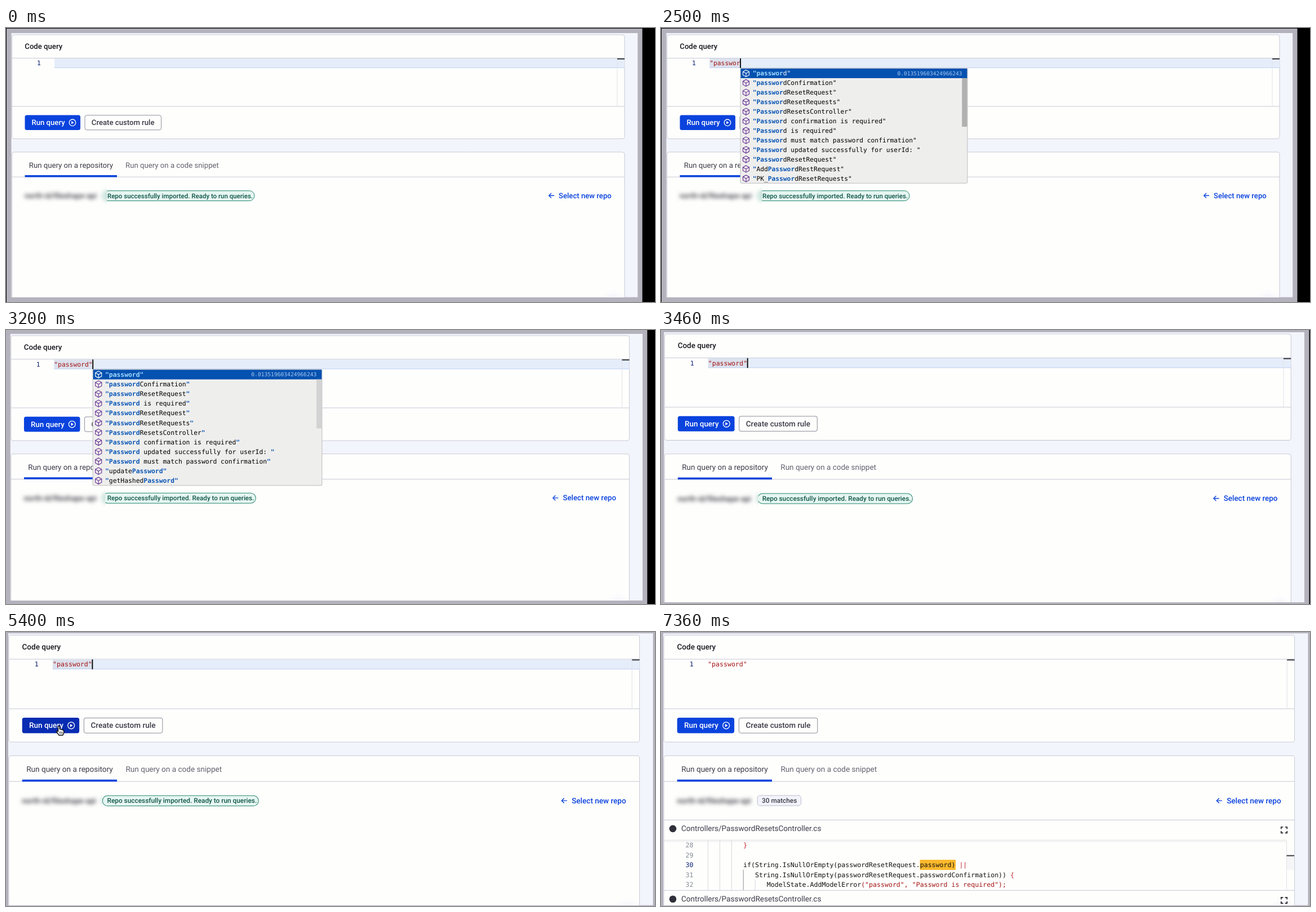
Recreate the animation shown at these times as an HTML page with a canvas. Size 1152 by 486 pixels, loop 8.53 s.

```html
<!DOCTYPE html>
<html lang="en">
<head>
<meta charset="utf-8">
<title>Code query</title>
<style>
html, body { margin: 0; width: 100%; height: 100%; overflow: hidden; background: #000; }
canvas { display: block; }
</style>
</head>
<body>
<canvas id="stage" width="1152" height="486"></canvas>
<script>
const ctx = document.getElementById('stage').getContext('2d');
ctx.textRendering = 'geometricPrecision';

const LOOP = 8530;
const BLUE = '#0a43dd', LINE = '#c9cad5', INK = '#3b3b48', PAPER = '#fefefd', RED = '#a31515';
const SANS = 'Roboto, sans-serif', MONO = '"DejaVu Sans Mono", monospace';
const QUERY = '"password"';
const KEYS = [800, 1460, 1600, 1760, 2000, 2130, 2330, 2500, 2630, 3060];
const POPUP = [1530, 3240], ZOOM = [2780, 3830], CLICK = 5500, CLEAR = 5660;
const TEXT_X = 86.3, CHAR = 6.77, CODE_CHAR = 6.97;

const TYPING_LIST = ['password', 'passwordConfirmation', 'passwordResetRequest', 'PasswordResetRequests',
  'PasswordResetsController', 'Password confirmation is required', 'Password is required',
  'Password must match password confirmation', 'Password updated successfully for userId: ',
  'PasswordResetRequest', 'AddPasswordRestRequest', 'PK_PasswordResetRequests'];
const CLOSED_LIST = ['password', 'passwordConfirmation', 'passwordResetRequest', 'Password is required',
  'PasswordResetRequest', 'PasswordResetRequests', 'PasswordResetsController',
  'Password confirmation is required', 'Password updated successfully for userId: ',
  'Password must match password confirmation', 'updatePassword', 'getHashedPassword'];

const clamp = v => Math.max(0, Math.min(1, v));
const progress = (t, [a, b]) => clamp((t - a) / (b - a));
const smoother = u => u * u * u * (u * (6 * u - 15) + 10);

function rect(x, y, w, h, fill) {
  ctx.fillStyle = fill;
  ctx.fillRect(x, y, w, h);
}

function box(x, y, w, h, r, fill, stroke, width = 1) {
  ctx.beginPath();
  ctx.roundRect(x, y, w, h, r);
  ctx.fillStyle = fill;
  ctx.fill();
  if (stroke) paint(stroke, width);
}

function paint(color, width) {
  ctx.strokeStyle = color;
  ctx.lineWidth = width;
  ctx.stroke();
}

function poly(points, color, width, close) {
  ctx.beginPath();
  points.forEach(([x, y]) => ctx.lineTo(x, y));
  if (close) ctx.closePath();
  paint(color, width);
}

function circle(x, y, r) {
  ctx.beginPath();
  ctx.arc(x, y, r, 0, 7);
}

function clip(x, y, w, h) {
  ctx.beginPath();
  ctx.rect(x, y, w, h);
  ctx.clip();
}

function text(s, x, y, color, size = 13.15, weight = 500, family = SANS, align = 'left') {
  ctx.font = `${weight} ${size}px ${family}`;
  ctx.fillStyle = color;
  ctx.textAlign = align;
  ctx.fillText(s, x, y);
}

const mono = (s, x, y, color, weight = 400, size = 11.25, align) =>
  text(s, x, y, color, size, weight, MONO, align);

function badge() {
  box(172, 288.7, 269, 17.8, 9, '#e6f6f1', '#25866f');
  text('Repo successfully imported. Ready to run queries.', 180, 301.5, '#0f5548', 11.5);
}

// The repository name and whatever lies left of `edge` are blurred.
function repoLine(edge, showBadge) {
  ctx.save();
  clip(24, 280, edge - 24, 36);
  ctx.filter = 'blur(3.5px)';
  text('north-id/fileshape-api', 33, 302, '#33333c', 13.2, 500);
  if (showBadge) badge();
  ctx.restore();
  if (!showBadge) return;
  ctx.save();
  clip(edge, 280, 300, 36);
  badge();
  ctx.restore();
}

function editor(t, typed) {
  const focused = t < CLICK;
  if (focused) {
    rect(86, 54, 1012, 17, '#e5edfa');
    rect(86, 70, 1012, 1, '#bfd2f3');
    rect(TEXT_X, 54.5, typed * CHAR, 15.5, 'rgba(110,90,90,.08)');
  }
  mono('1', 55, 66.4, '#0b216f');
  mono(QUERY.slice(0, typed), TEXT_X, 66.4, RED);
  rect(1084.5, 54, 1, 84.5, '#e2e2e8');
  rect(1085, 53.8, 13, 2, '#3c3c42');

  const reset = typed ? KEYS[typed - 1] : 330;
  if (focused && t >= reset && Math.floor((t - reset) / 500) % 2 === 0)
    rect(TEXT_X + typed * CHAR - .3, 54, 1.8, 17, '#000');
}

function buttons(hover) {
  box(33.5, 154.5, 98.5, 26.5, 3.5, hover ? '#082cb2' : BLUE);
  text('Run query', 45.5, 172.3, '#fff');
  circle(118, 167.8, 5.8);
  paint('#fff', 1.3);
  ctx.beginPath();
  [[116.2, 165], [120.7, 167.8], [116.2, 170.6]].forEach(p => ctx.lineTo(...p));
  ctx.fillStyle = '#fff';
  ctx.fill();
  box(140, 154.8, 135.5, 26, 3.5, PAPER, '#8f8f9b');
  text('Create custom rule', 151.8, 172.3, INK);
}

function page(t, zoom, typed, hover) {
  rect(1, 1, 1128.5, 490, '#b4b2bc');
  rect(9.5, 9, 1111.7, 468.5, '#f3f5fc');
  ctx.save();
  clip(9.5, 9, 1111.7, 468.5);

  box(10.5, 12, 1087.5, 184.5, 4, PAPER, LINE);
  text('Code query', 33.3, 36.8, '#18181f');
  rect(10.5, 53, 1087.5, 1, LINE);
  editor(t, typed);
  rect(10.5, 138.5, 1087.5, 1, LINE);
  buttons(hover);

  box(10.5, 220, 1087.5, 300, 4, PAPER, LINE);
  text('Run query on a repository', 40.8, 247.5, INK, 13.2, 400);
  text('Run query on a code snippet', 212, 247.5, '#62626f', 13.2, 400);
  rect(10.5, 263.7, 1087.5, 1, LINE);
  rect(33.5, 261, 163.5, 3.5, BLUE);
  repoLine(179 - 7.5 * zoom, t < CLEAR);
  poly([[973, 297.3], [964, 297.3]], BLUE, 1.4);
  poly([[968, 293], [963.7, 297.3], [968, 301.6]], BLUE, 1.4);
  text('Select new repo', 981, 301.8, BLUE);

  const glow = ctx.createRadialGradient(1078, 487, 8, 1078, 487, 24);
  glow.addColorStop(0, '#f3f4fb');
  glow.addColorStop(1, 'rgba(250,250,254,0)');
  rect(1050, 460, 47, 20, glow);
  ctx.restore();
}

function cube(x, y, color) {
  poly([[x, y - 6], [x + 5.5, y - 3], [x + 5.5, y + 3], [x, y + 6], [x - 5.5, y + 3], [x - 5.5, y - 3]], color, 1.1, true);
  poly([[x - 5.5, y - 3], [x, y], [x + 5.5, y - 3]], color, 1.1);
  poly([[x, y], [x, y + 6]], color, 1.1);
}

function popup(t, typed) {
  const x = TEXT_X + typed * CHAR + .5, top = 71.3, row = 16.95;
  const closed = typed === QUERY.length;
  const match = Math.min(typed - 1, 8);
  box(x, top, 403, 204, 2, '#eeeeed', '#bdbdc0');
  rect(x + .5, top + .7, 402, row, '#0551b0');

  (closed ? CLOSED_LIST : TYPING_LIST).forEach((word, i) => {
    const y = top + .7 + row * (i + .5);
    const plain = i ? '#000' : '#fff', lit = i ? '#0a56b5' : '#a4dcff';
    cube(x + 10, y, i ? '#652d90' : '#fff');
    const at = word.toLowerCase().indexOf('password');
    let px = x + 21.7;
    const part = (s, on) => {
      mono(s, px, y + 4, on ? lit : plain, on ? 700 : 400);
      px += s.length * CHAR;
    };
    part('"', true);
    part(word.slice(0, at), false);
    part(word.slice(at, at + match), true);
    part(word.slice(at + match), false);
    part('"', closed);
  });
  mono('0.013519603424966243', x + 393.5, top + 12.4, '#a9c9ee', 400, 9.56, 'right');
  rect(x + 393.3, top + 17.8, 9.2, typed < 5 ? 21 : 86, closed ? '#d3d3d3' : '#b1b1b1');
}

function fileHeader(y) {
  circle(21, y + .7, 6.3);
  ctx.fillStyle = '#30303a';
  ctx.fill();
  text('Controllers/PasswordResetsController.cs', 36, y + 4.6, INK, 13.55, 400);
  for (const sx of [-1, 1]) for (const sy of [-1, 1]) {
    const cx = 1106 + sx * 5.2, cy = y + 3 + sy * 5.2;
    poly([[cx - sx * 3.5, cy], [cx, cy], [cx, cy - sy * 3.5]], '#222229', 1.7);
  }
}

function codeLine(number, col, parts) {
  const y = 378 + (number - 28) * 17.5 + 4.2;
  mono(number, 57.5, y, number === 30 ? '#0b216f' : '#858b94', 400, 11.58, 'right');
  let x = 83.3 + col * CODE_CHAR;
  parts.forEach(([s, color = '#111']) => {
    mono(s, x, y, color, 400, 11.58);
    x += s.length * CODE_CHAR;
  });
}

function results(alpha) {
  ctx.save();
  ctx.globalAlpha = alpha;
  clip(5, 286, 1119.5, 198);
  box(171, 290, 77.5, 18, 4.5, '#f3f4fb', '#b9bccb');
  text('30 matches', 179, 303.2, INK, 11.85);
  rect(5, 333, 1119, 1, LINE);
  fileHeader(348.2);

  const shade = ctx.createLinearGradient(0, 368, 0, 374);
  shade.addColorStop(0, '#e8e8ec');
  shade.addColorStop(1, PAPER);
  rect(6, 368.5, 1104, 5, shade);
  for (let i = 0; i < 3; i++) rect(83 + i * 20.9, 370, 1, 88, '#d8d8dc');
  rect(145.7, 421.5, 1, 36.5, '#8f8f94');
  rect(166.6, 439, 1, 19, '#d8d8dc');
  rect(459.5, 404, 63.5, 18, '#fbb92c');

  codeLine(28, 9, [['}', '#c3262e']]);
  codeLine(29, 9, []);
  codeLine(30, 9, [['if(String.IsNullOrEmpty(passwordResetRequest.password) '], ['||', '#c3262e']]);
  codeLine(31, 12, [['String.IsNullOrEmpty(passwordResetRequest.passwordConfirmation)) '], ['{', '#c3262e']]);
  codeLine(32, 15, [['ModelState.AddModelError'], ['("password", "Password is required");', RED]]);

  rect(1110, 370, 1, 88, '#e2e2e8');
  rect(1111, 397, 12.5, 25, '#f5f5f7');
  rect(1110.5, 395.7, 13.5, 2, '#3c3c42');
  rect(5, 457.8, 1119, 1, LINE);
  fileHeader(473);
  ctx.restore();
}

function pointer(x, y, hand) {
  const shape = hand
    ? 'M-1.5 0Q0-1.5 1.3 0V5Q3 4 4 5.6 6 5 6.6 6.6 8.5 6 8.6 8V11Q8 13 7 15.5H0L-4.6 9.2Q-4.4 7-1.5 9.2Z'
    : 'M0 0V14L3.3 11 5.5 16 7.8 15 5.6 10.2H10Z';
  const path = new Path2D(shape);
  ctx.save();
  ctx.translate(x, y);
  ctx.lineJoin = 'round';
  ctx.lineWidth = 1.3;
  ctx.fillStyle = hand ? '#fff' : '#000';
  ctx.strokeStyle = hand ? '#000' : '#fff';
  ctx.fill(path);
  ctx.stroke(path);
  if (hand) for (const dx of [1.5, 3.7, 5.8]) poly([[dx, 9], [dx, 13]], '#000', .8);
  ctx.restore();
}

function mouse(t) {
  if (t < 4830 || t >= 7360) return null;
  const come = 1 - (1 - progress(t, [4830, 5300])) ** 2;
  const leave = smoother(progress(t, [7000, 7400]));
  const x = 300 - 206 * come + 200 * leave, y = 14 + 153.5 * come + 226 * leave;
  return { x, y, over: x > 28 && x < 130 && y > 152 && y < 179 };
}

function draw(t) {
  const zoom = smoother(progress(t, ZOOM));
  const typed = KEYS.filter(k => t >= k).length;
  const m = mouse(t);
  const scale = 1 + .0295 * zoom;

  ctx.setTransform(1, 0, 0, 1, 0, 0);
  rect(0, 0, 1152, 486, '#000');
  ctx.setTransform(scale, 0, 0, scale, -5.8 * zoom, -6.94 * zoom);
  page(t, zoom, typed, m && m.over);
  if (t >= POPUP[0] && t < POPUP[1]) popup(t, typed);
  ctx.setTransform(1, 0, 0, 1, 0, 0);
  if (t >= CLEAR) results(progress(t, [5700, 6230]));
  if (m) pointer(m.x, m.y, m.over);
}

const start = performance.now();
function tick() {
  draw((performance.now() - start) % LOOP);
  requestAnimationFrame(tick);
}
tick();
</script>
</body>
</html>
```
